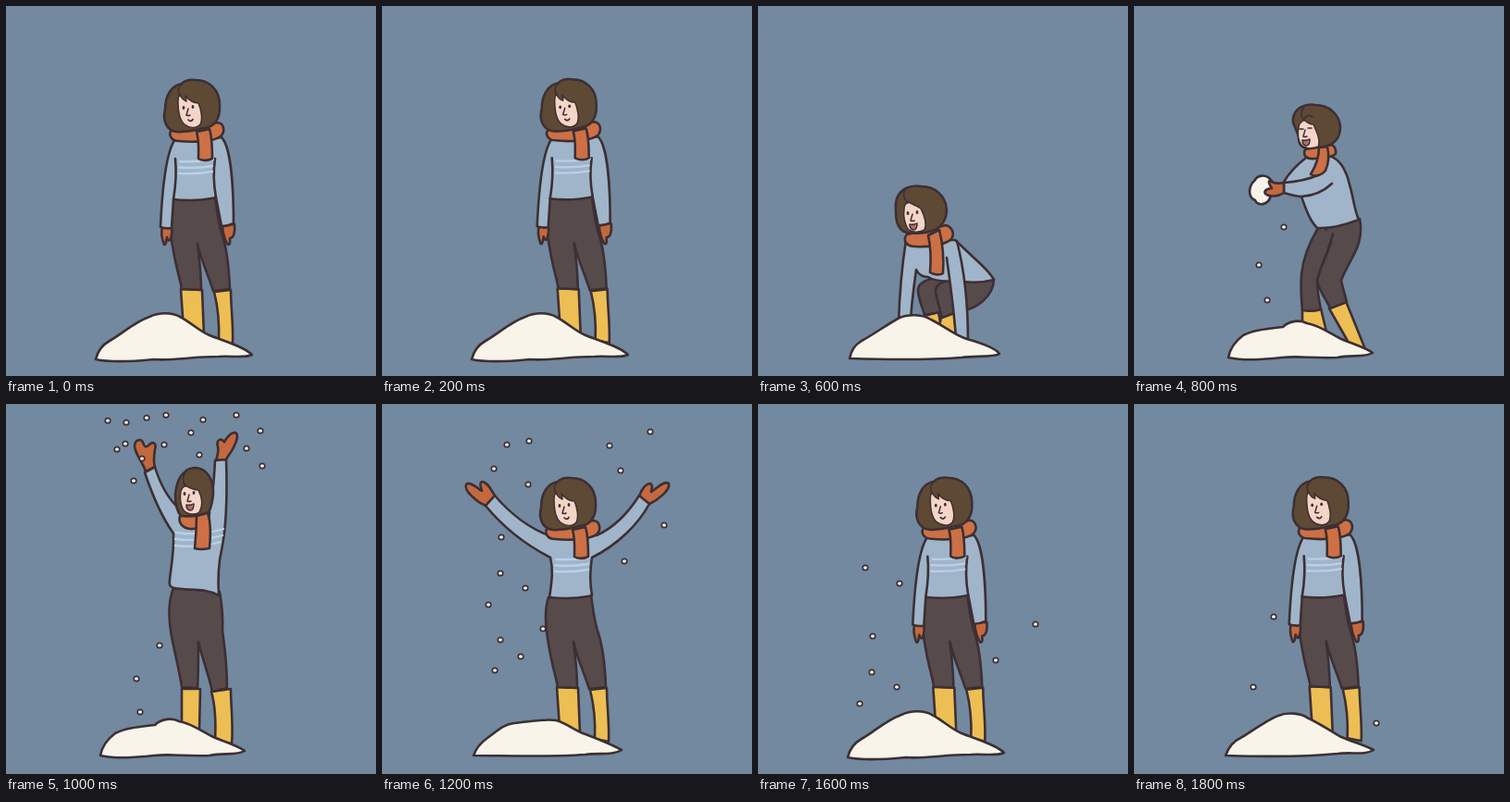
Animation of 400 by 400 pixels, one loop 2 s. Source, as an HTML page with a canvas:

```html
<!DOCTYPE html>
<html lang="en">
<head>
<meta charset="utf-8">
<title>Snow play</title>
<style>
html, body { margin: 0; width: 100%; height: 100%; overflow: hidden; background: #7289a0; }
canvas { display: block; width: 400px; height: 400px; }
</style>
</head>
<body>
<canvas id="stage" width="400" height="400"></canvas>
<script>
const ctx = document.getElementById('stage').getContext('2d');
const STEP = 200;
const C = {
  sky: '#7289a0', ink: '#3d2f33', pants: '#574a4b', knit: '#a0b5c9', stripe: '#bad0e8',
  hair: '#5e4935', skin: '#f4d5c7', scarf: '#cd7045', glove: '#c4683f', boot: '#edbe53', snow: '#f8f4ea'
};

function shape(fill, ...paths) {
  for (const d of paths) {
    ctx.fillStyle = C[fill];
    ctx.fill(new Path2D(d));
    line(d);
  }
}

function line(d, color = 'ink', width = 2.6) {
  ctx.strokeStyle = C[color];
  ctx.lineWidth = width;
  ctx.stroke(new Path2D(d));
}

function dot(x, y, rx, ry, color) {
  ctx.fillStyle = color;
  ctx.beginPath();
  ctx.ellipse(x, y, rx, ry, 0, 0, Math.PI * 2);
  ctx.fill();
}

function stripes(...paths) {
  for (const d of paths) line(d, 'stripe', 2.3);
}

function head(hair, face, parting) {
  shape('hair', hair);
  ctx.fillStyle = C.skin;
  ctx.fill(new Path2D(face));
  line(face, 'ink', 1.5);
  if (parting) line(parting, 'ink', 1.6);
}

// Eyes and nose are placed around the point between the eyes.
function features(x, y, mouth, closed) {
  if (closed) line(`M${x - 6} ${y}h4M${x + 3} ${y - 1}h4`, 'ink', 1.6);
  else {
    dot(x - 5, y, 1.4, 1.9, C.ink);
    dot(x + 5, y - 1, 1.4, 1.9, C.ink);
  }
  line(`M${x} ${y + 1}L${x - 2} ${y + 8}Q${x} ${y + 9} ${x + 2} ${y + 8}`, 'ink', 1.5);
  if (mouth === 'open') {
    const d = `M${x - 3} ${y + 12}Q${x + 1} ${y + 13} ${x + 5} ${y + 11}Q${x + 5} ${y + 18} ${x + 1} ${y + 18}Q${x - 3} ${y + 17} ${x - 3} ${y + 12}Z`;
    dot(x + 1, y + 14.5, 3, 2.4, '#b96a6a');
    line(d, 'ink', 1.6);
  } else line(`M${x} ${y + 13}Q${x + 3} ${y + 16} ${x + 5} ${y + 12.5}`, 'ink', 1.7);
}

function flakes(list) {
  for (const [x, y] of list) {
    dot(x, y, 3.6, 3.5, C.ink);
    dot(x, y, 2, 1.8, C.snow);
  }
}

const mounds = {
  wide: 'M97 382C99 373 103 367 112 362C125 355 138 342 155 336C165 331 180 331 188 336C200 342 208 351 220 356C235 362 257 368 266 377C258 381 245 378 230 379C200 379 180 384 160 382C140 384 115 386 97 382Z',
  round: 'M99 382C99 372 102 365 112 360C125 351 138 340 153 336C163 333 175 333 183 337C195 340 203 349 216 356C230 362 250 368 264 378C255 381 235 379 220 381C180 384 130 384 99 382Z',
  dug: 'M99 381C101 372 104 367 112 362C125 355 140 344 153 337C162 333 178 333 187 339C200 345 212 356 226 360C240 364 257 370 261 376C255 380 235 378 220 380C180 383 130 382 99 381Z',
  low: 'M102 380C104 369 110 362 118 356C130 350 145 349 161 347C168 340 180 339 187 343C200 345 210 353 222 359C235 365 250 369 258 375C250 380 235 377 220 380C190 381 180 378 160 380C140 382 120 384 102 380Z',
  flat: 'M99 380C102 371 107 366 114 361C125 353 132 346 143 345C158 344 175 340 188 342C200 345 208 353 220 357C233 362 250 369 259 374C250 380 235 377 220 379C180 382 130 380 99 380Z',
  last: 'M99 380C102 371 108 364 117 360C130 352 145 341 156 337C165 333 180 334 187 339C200 345 212 353 222 359C235 365 250 369 259 374C250 380 235 376 220 378C180 382 130 381 99 380Z'
};

function uprightLegs() {
  shape('boot',
    'M189 306L212 307L214 356L192 350Z',
    'M225 309L243 307C243 325 246 345 245 365L230 362C231 340 229 325 225 309Z');
  shape('pants', 'M180 209C174 226 178 250 181 265C184 283 188 295 190 306L211 307C211 290 209 273 207 257C211 275 219 292 224 308L242 306C241 280 239 262 233 245C229 232 228 220 226 207Z');
}

function uprightHead() {
  shape('scarf',
    'M180 133C174 139 179 146 187 146C203 148 226 146 232 141C238 135 235 127 229 126Z',
    'M206 136C209 146 208 157 208 165C212 168 219 167 223 165C223 153 223 143 220 133Z');
  head('M190 84C178 86 172 98 172 112C169 123 173 134 184 136C195 137 206 134 214 132C225 131 232 122 231 107C231 90 219 80 205 80C198 79 192 81 190 84Z',
    'M186 103C186 99 187 97 188 96C190 100 192 102 195 103Q195 99 194 97C198 102 203 105 208 105C211 112 213 122 210 128C206 133 198 132 193 128C187 123 186 112 186 103Z',
    'M190 84Q184 89 188 97');
  features(197, 110, 'smile');
}

const upperStripes = ['M188 168Q206 169 224 166', 'M187 174.5Q206 176 223 173', 'M187 181Q206 182 223 179'];

function stand() {
  uprightLegs();
  shape('glove',
    'M169 239C167 246 169 253 171 258C174 258 173 253 174 250C175 254 177 255 178 251Q180 246 179 239Z',
    'M234 237C234 245 237 254 240 258C243 258 242 254 242 251C246 251 248 245 247 236Z');
  shape('knit', 'M183 144C174 156 169 195 167 239Q173 241 179 240L181 209C195 211 215 210 227 207L233 238Q240 238 246 235C246 195 243 152 233 142Z');
  line('M181 209Q185 185 183 165M227 207Q223 185 226 165');
  stripes(...upperStripes);
  uprightHead();
}

function spread() {
  uprightLegs();
  shape('glove',
    'M122 99C118 93 114 84 108 84C104 86 108 91 108 94C102 90 94 83 91 87C88 94 103 106 112 110Z',
    'M278 100C280 93 285 86 290 86C294 88 291 92 291 95C297 91 306 82 310 86C312 93 298 104 289 108Z');
  shape('knit', 'M183 143C160 135 138 118 122 99L112 110C130 132 155 152 182 166C185 178 184 190 181 209C195 211 215 210 227 207C224 190 225 178 227 166C255 152 277 130 289 108L278 99C266 118 250 134 232 142Z');
  stripes(...upperStripes);
  uprightHead();
}

function bend() {
  shape('boot',
    'M179 325L198 317L215 354L192 350Z',
    'M214 325L229 316C235 335 243 350 248 370L230 362Z');
  shape('glove',
    'M252 290C250 297 250 303 252 306C255 306 257 304 258 303C263 307 268 311 274 310C276 306 270 297 264 287Z',
    'M123 298C119 306 114 315 113 323C116 327 118 321 119 318C120 322 122 329 125 326C126 318 130 312 133 300Z');
  shape('pants',
    'M200 264L236 263C242 271 247 281 245 289C240 297 230 303 221 306C222 310 226 314 229 317L214 325C208 318 202 308 200 301C204 291 214 281 222 270Z',
    'M197 264C186 274 172 290 170 303C172 312 177 320 179 325L197 318C194 312 193 306 195 302C203 290 212 280 222 271');
  shape('knit', 'M162 211C150 225 142 243 136 258C131 272 125 284 123 297Q129 301 136 299C143 283 161 258 171 236C177 248 185 259 196 264C206 268 218 266 231 263C238 272 243 283 248 293Q255 292 261 287C253 264 243 235 226 217Q216 207 204 207Z');
  stripes('M187 243Q201 239 211 232', 'M190 249Q204 245 214 238', 'M194 255Q206 251 215 245');
  shape('scarf',
    'M162 202C156 208 161 215 168 215C181 216 199 213 205 206C209 199 205 192 199 192Z',
    'M184 202C187 215 188 228 187 240C192 243 197 241 201 239C203 225 200 210 195 197Z');
  head('M159 152C150 156 146 165 147 172C147 182 149 192 155 200C162 203 170 201 176 202C190 199 199 192 199 178C199 162 188 149 174 149C168 149 162 150 159 152Z',
    'M152 177C152 174 153 173 155 172Q158 176 161 176Q160 173 160 171C164 174 170 175 173 174C177 182 178 192 174 198C168 202 160 201 157 196C153 190 152 182 152 177Z',
    'M156 153Q152 161 155 172');
  features(162, 181, 'smile');
}

function squat() {
  shape('boot', 'M180 335L195 331L199 352L184 344Z', 'M198 337L212 332L214 354L195 350Z');
  shape('pants',
    'M215 295L255 295C255 306 250 313 243 319Q234 327 223 329L210 326Z',
    'M192 294C180 296 172 301 173 309C174 318 178 327 180 334L197 331L204 296Z',
    'M226 296C206 294 191 299 192 309C194 320 197 330 199 337L214 331L219 305Z');
  shape('knit',
    'M160 253C155 285 153 312 152 342L165 340C166 320 169 300 171 285C174 291 179 293 184 293C192 298 205 298 215 297Q236 301 255 296C250 286 238 277 229 268L213 253Z',
    'M204 272C207 295 211 320 214 358L227 362C227 325 223 285 215 254');
  shape('scarf',
    'M161 247C156 253 160 260 170 260C185 261 203 258 209 252C213 246 210 239 203 237Z',
    'M184 248C187 262 187 277 186 288C190 291 197 291 200 289C201 275 200 258 196 242Z');
  head('M160 197C150 202 148 212 149 222C149 235 152 243 161 245C170 246 180 246 188 243C199 240 204 230 204 220C203 205 191 195 177 195C171 194 164 195 160 197Z',
    'M158 219C158 215 160 213 163 212C168 215 174 217 176 219C180 227 183 236 180 242C175 245 166 245 162 241C158 234 157 226 158 219Z',
    'M160 197Q154 205 162 213');
  features(167, 224, 'open');
}

function scoop() {
  shape('boot', 'M182 328L202 327L208 352L182 346Z', 'M211 327L229 319L250 371L232 364Z');
  shape('pants',
    'M205 238L244 230C247 245 243 260 236 272C231 282 226 290 224 297C226 305 228 312 230 320L212 327C208 317 200 308 198 297C200 283 209 270 213 255Z',
    'M199 240C190 255 183 272 181 290C180 305 181 319 182 329Q192 331 202 328C200 318 198 307 198 297C201 281 210 268 215 246');
  shape('knit', 'M186 164C177 171 168 180 162 190L162 202C169 204 176 206 181 206C186 220 190 232 198 240C212 241 230 236 243 231C238 220 237 206 233 193C229 176 222 165 211 162Z');
  line('M162 191C178 190 190 187 201 182M181 206Q200 205 214 192');
  shape('snow', 'M131 188C133 183 142 182 146 186C150 190 152 192 149 196C146 203 150 206 145 211C140 216 133 215 131 210C123 207 123 195 131 188Z');
  shape('glove', 'M162 191C157 192 151 192 147 189C144 190 148 195 149 197C144 197 140 200 142 203C147 207 156 206 162 202Z');
  shape('scarf',
    'M185 155C182 162 187 166 195 165C205 165 214 163 218 160C219 154 216 150 212 150Z',
    'M200 153C200 165 196 174 191 182C196 185 203 183 207 178C211 169 211 161 209 152Z');
  head('M184 108C175 111 171 118 172 126C174 132 177 136 178 142C178 150 182 154 190 154L205 152C217 150 223 142 223 131C222 116 210 107 196 107C190 106 186 107 184 108Z',
    'M178 131C178 127 181 125 184 123C187 126 190 128 194 128C198 137 202 146 199 152C191 155 183 154 180 149C177 143 177 136 178 131Z',
    'M184 108Q178 118 184 124M184 122Q187 116 193 120');
  features(185, 133, 'open', true);
}

function toss() {
  shape('boot',
    'M190 308L210 308L209 354L190 348Z',
    'M222 311L243 308C243 325 246 350 244 367L226 364C227 345 226 325 222 311Z');
  shape('pants', 'M181 199C175 215 176 230 178 245C181 265 187 285 190 306L207 307C208 290 208 272 208 257C212 275 219 292 223 311L239 307C239 280 236 260 234 245C235 230 233 215 231 203Z');
  shape('glove',
    'M151 73C148 63 140 55 139 46C139 38 147 36 149 44C151 48 153 46 156 43C160 40 163 44 161 49C160 56 159 62 161 68Z',
    'M227 61C229 55 230 50 229 46C227 39 232 36 236 41C239 36 243 30 248 31C252 33 249 41 246 47C243 53 240 56 238 60Z');
  shape('knit', 'M150 74L161 68C167 88 175 102 187 113L218 117C224 100 225 80 226 61L238 60C239 90 239 130 233 158C229 175 229 190 230 207C215 198 197 202 182 199C177 198 176 195 177 190C178 178 182 160 181 140C167 120 157 95 150 74Z');
  stripes('M184 139Q210 143 235 135', 'M183 146Q210 149 234 142', 'M183 153Q210 156 232 149');
  shape('scarf',
    'M188 121C186 129 191 134 199 135C207 136 214 131 219 128L220 117Z',
    'M206 121C206 135 205 147 204 156C209 158 215 157 220 156C221 143 222 130 218 117Z');
  head('M194 73C186 78 184 88 183 98C183 108 184 115 189 121C200 122 212 120 219 117C222 113 223 105 224 98C225 82 217 70 206 69C200 69 196 70 194 73Z',
    'M189 94C190 91 192 89 194 88C199 91 204 93 208 93C212 101 213 110 209 117C203 121 194 119 191 113C188 107 188 100 189 94Z',
    'M194 73Q189 82 194 89');
  features(198, 97, 'open');
}

const drops = [[162, 239], [135, 280], [144, 318]];
const burst = [
  [110, 18], [130, 20], [152, 15], [173, 12], [213, 17], [249, 12], [275, 29], [260, 48], [277, 67], [209, 55],
  [171, 44], [200, 31], [129, 43], [120, 49], [147, 59], [138, 83], [166, 261], [141, 297], [145, 333]
];
const drift = [
  [135, 97], [159, 93], [121, 123], [158, 140], [246, 98], [290, 83], [258, 125], [305, 184], [262, 223],
  [129, 197], [128, 236], [155, 252], [115, 270], [174, 296], [128, 308], [150, 326], [122, 341]
];
const last = [[151, 230], [129, 306], [262, 345]];
const early = drift.map(([x, y]) => [x, y - 53]);
const late = [2, 3, 7, 8, 9, 10, 11, 12].map(i => [drift[i][0] - 5, drift[i][1] + 54]);

const scenes = [
  { pose: stand, mound: 'wide' },
  { pose: stand, mound: 'wide', shift: 0.7 },
  { pose: bend, mound: 'round' },
  { pose: squat, mound: 'dug' },
  { pose: scoop, mound: 'low', snow: drops },
  { pose: toss, mound: 'low', snow: burst },
  { pose: spread, mound: 'flat', snow: early },
  { pose: stand, mound: 'flat', shift: 0.7, snow: drift },
  { pose: stand, mound: 'wide', shift: 0.3, snow: late },
  { pose: stand, mound: 'last', shift: 0.7, snow: last }
];

function render(time) {
  const { pose, mound, shift = 0, snow = [] } = scenes[Math.floor(time / STEP) % scenes.length];
  ctx.fillStyle = C.sky;
  ctx.fillRect(0, 0, 400, 400);
  ctx.lineCap = ctx.lineJoin = 'round';
  ctx.save();
  ctx.translate(shift, -shift);
  pose();
  ctx.restore();
  shape('snow', mounds[mound]);
  flakes(snow);
}

const start = performance.now();
function tick() {
  render(performance.now() - start);
  requestAnimationFrame(tick);
}
tick();
</script>
</body>
</html>
```
